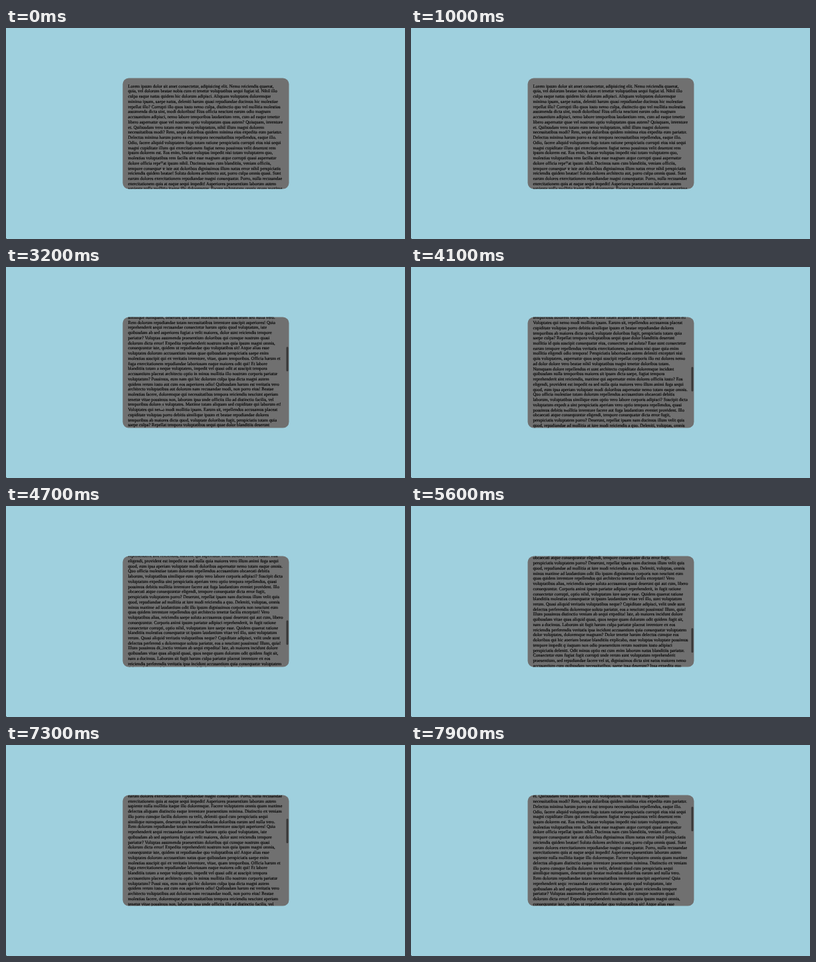
Write an HTML page that moves like this. It is 600 px wide and 318 px high and loops after 8000 ms.

```html
<!DOCTYPE html>
<html lang="la">
<head>
<meta charset="utf-8">
<title>Scrolling text box</title>
<style>
html, body { margin: 0; width: 100%; height: 100%; overflow: hidden; background: #9fd0de; }
#box { position: absolute; left: 175px; top: 75px; width: 250px; height: 167px;
  transform: translate(.5px, .6px); border-radius: 9px; overflow: hidden; background: #707070; }
#text { position: absolute; left: 0; top: 0; margin: 0; color: #000;
  font: 15.54px/18px "Liberation Serif", Times, serif; text-rendering: geometricPrecision;
  -webkit-text-stroke: .35px #000; transform-origin: 0 0; }
#thumb { position: absolute; right: 1px; top: 0; width: 3px; height: 37px;
  border-radius: 1.5px; background: #393939; }
#overlay { position: absolute; left: 0; top: 0; }
</style>
</head>
<body>
<div id="box">
<pre id="text">
Lorem ipsum dolor sit amet consectetur, adipisicing elit. Nemo reiciendis quaerat,
quia, vel dolorum beatae nobis cum et tenetur voluptatibus sequi fugiat id. Nihil illo
culpa eaque natus quidem hic dolorum adipisci. Aliquam voluptates doloremque
minima ipsam, saepe natus, deleniti harum quasi repudiandae ducimus hic molestiae
repellat illo? Corrupti illo quos iusto nemo culpa, distinctio quo vel mollitia molestias
assumenda dicta sint, modi doloribus! Eius officia nesciunt earum odio magnam
accusantium adipisci, nemo labore temporibus laudantium rem, cum ad eaque tenetur
libero aspernatur quae vel nostrum optio voluptatum quas autem? Quisquam, inventore
et. Quibusdam vero totam eum nemo voluptatum, nihil illum magni dolorem
necessitatibus modi? Rem, sequi doloribus quidem minima eius expedita eum pariatur.
Delectus minima harum porro ea est tempora necessitatibus repellendus, eaque illo.
Odio, facere aliquid voluptatem fuga totam ratione perspiciatis corrupti eius nisi sequi
magni cupiditate illum qui exercitationem fugiat nemo possimus velit deserunt rem
ipsum dolorem est. Eos enim, beatae voluptas impedit nisi totam voluptatem quo,
molestias voluptatibus rem facilis sint esse magnam atque corrupti quasi aspernatur
dolore officia repellat ipsum nihil. Ducimus nam cum blanditiis, veniam officiis,
tempore consequatur iste aut doloribus dignissimos illum natus error nihil perspiciatis
reiciendis quidem beatae! Soluta dolores architecto aut, porro culpa omnis quasi. Sunt
earum dolores exercitationem repudiandae magni consequatur. Porro, nulla recusandae
exercitationem quis at eaque sequi impedit! Asperiores praesentium laborum autem
sapiente nulla mollitia itaque illo doloremque. Facere voluptatem omnis quam maxime
delectus aliquam distinctio eaque inventore praesentium minima. Distinctio ex veniam
illo porro cumque facilis dolorem ea velit, deleniti quod cum perspiciatis sequi
similique numquam, deserunt qui beatae molestias doloribus earum sed nulla vero.
Rem dolorum repudiandae totam necessitatibus inventore suscipit asperiores! Quia
reprehenderit sequi recusandae consectetur harum optio quod voluptatum, iste
quibusdam ab sed asperiores fugiat a velit maiores, dolor sunt reiciendis tempore
pariatur? Voluptas assumenda praesentium doloribus qui cumque nostrum quasi
dolorum dicta error! Expedita reprehenderit nostrum non quia ipsum magni omnis,
consequuntur iste, quidem ut repudiandae quo voluptatibus sit! Atque alias esse
voluptates dolorum accusantium natus quae quibusdam perspiciatis saepe enim
molestias suscipit qui ex veritatis inventore, vitae, quam temporibus. Officia harum et
fuga exercitationem repudiandae laboriosam eaque maiores odit qui! Et labore
blanditiis totam a neque voluptatem, impedit vel quasi odit at suscipit tempora
accusantium placeat architecto optio in minus mollitia illo nostrum corporis pariatur
voluptatum? Possimus, eum nam qui hic dolorum culpa ipsa dicta magni autem
quidem rerum iusto aut cum eos asperiores odio! Quibusdam harum est veritatis vero
architecto voluptatibus aut dolorum nam recusandae modi, non porro eius! Beatae
molestias facere, doloremque qui necessitatibus tempora reiciendis nesciunt aperiam
tenetur vitae possimus non, laborum ipsa unde officiis illo ad distinctio facilis, vel
temporibus dolorem voluptates. Maxime totam aliquam sed cupiditate qui laborum et!
Voluptates qui nemo modi mollitia ipsam. Earum sit, repellendus accusamus placeat
cupiditate voluptas porro debitis similique ipsum et beatae repudiandae dolores
temporibus ab maiores dicta quod, voluptate doloribus fugit, perspiciatis totam quia
saepe culpa? Repellat tempora voluptatibus sequi quae dolor blanditiis deserunt
mollitia id quis suscipit consequatur eius, consectetur ad soluta? Esse sunt consectetur
earum tempore repellendus veritatis exercitationem, possimus nisi quae quia enim
mollitia eligendi odio tempora! Perspiciatis laboriosam autem deleniti excepturi nisi
quis voluptatem, aspernatur quos sequi suscipit repellat corporis illo est dolores nemo
ad dolor dolore vero beatae nihil voluptatibus magni tenetur doloribus totam.
Numquam dolore repellendus et sunt architecto cupiditate doloremque incidunt
quibusdam nulla temporibus maiores sit ipsam dicta saepe, fugiat tempora
reprehenderit sint reiciendis, maxime qui aspernatur enim dolores officiis iusto? Eos
eligendi, provident est impedit ea sed nulla quia maiores vero illum animi fuga sequi
quod, eum ipsa aperiam voluptate modi doloribus aspernatur nemo totam eaque omnis.
Quo officia molestiae totam dolorum repellendus accusantium obcaecati debitis
laborum, voluptatibus similique eum optio vero labore corporis adipisci? Suscipit dicta
voluptatum expedita sint perspiciatis aperiam vero optio tempora repellendus, quasi
possimus debitis mollitia inventore facere aut fuga laudantium eveniet provident. Illo
obcaecati atque consequuntur eligendi, tempore consequatur dicta error fugit,
perspiciatis voluptatem porro? Deserunt, repellat ipsam nam ducimus illum velit quis
quod, repudiandae ad mollitia at iure modi reiciendis a quo. Deleniti, voluptas, omnis
minus maxime ad laudantium odit illo ipsum dignissimos corporis non nesciunt eum
quas quidem inventore repellendus qui architecto tenetur facilis excepturi! Vero
voluptatibus alias, reiciendis saepe soluta accusamus quasi deserunt qui aut cum, libero
consequuntur. Corporis animi ipsum pariatur adipisci reprehenderit, in fugit ratione
consectetur corrupti, optio nihil, voluptatum iure saepe esse. Quidem quaerat ratione
blanditiis molestias consequatur ut ipsum laudantium vitae vel illo, sunt voluptatum
rerum. Quasi aliquid veritatis voluptatibus neque? Cupiditate adipisci, velit unde sunt
delectus perferendis doloremque soluta pariatur, eos a nesciunt possimus! Illum, quia!
Illum possimus distinctio veniam ab sequi expedita! Iste, ab maiores incidunt dolore
quibusdam vitae quas aliquid quasi, quos neque quam dolorum odit quidem fugit sit,
nam a ducimus. Laborum sit fugit harum culpa pariatur placeat inventore ex eos
reiciendis perferendis veritatis ipsa incidunt accusantium quia consequatur voluptatem
dolor voluptates, doloremque magnam? Dolor tenetur harum delectus cumque eos
doloribus qui hic aperiam beatae blanditiis explicabo, esse voluptas voluptate possimus
tempore impedit quisquam non odio praesentium rerum nostrum iusto adipisci
perspiciatis deleniti. Odit minus optio est cum enim laborum natus blanditiis pariatur.
Consectetur eum fugiat fugit corrupti unde rerum sunt voluptatum reprehenderit
praesentium, sed repudiandae facere vel ut, dignissimos dicta sint natus maiores nemo
accusantium cum quibusdam necessitatibus, saepe ipsa deserunt? Ipsa expedita quo
quaerat numquam eius dolorem, tempora nisi veritatis harum sequi. Magnam rerum
itaque nobis possimus, voluptate earum illo distinctio fugit aliquam et modi.
</pre>
<div id="thumb"></div>
</div>
<svg id="overlay" width="600" height="318" fill="none">
  <defs><path id="beam" d="M232 205q2 0 2 1.4v6.4q0 1.4-2 1.4M236 205q-2 0-2 1.4v6.4q0 1.4 2 1.4"/></defs>
  <use href="#beam" stroke="#9a9a9a" stroke-width="1.7"/>
  <use href="#beam" stroke="#444" stroke-width=".6"/>
  <path d="M0 317h1v1h-1z" fill="#4d5a5e"/>
</svg>
<script>
const LOOP = 8000, STEP = 100, SCALE = 0.43;
const TEXT_LEFT = 8, TEXT_TOP = 8.5, THUMB_TOP = 0.7, THUMB_RATE = 0.2313;

// Wheel bursts: start time, then the scroll offset after each step.
const bursts = [
  [1800, 4, 18, 37, 55.3, 66, 71],
  [2600, 83, 115, 145, 163, 170],
  [3200, 189.8, 212, 222],
  [3800, 250, 285, 310, 321],
  [4400, 345, 380, 405, 415],
  [5000, 455, 475],
  [5600, 466, 440, 405, 375, 345, 325, 313, 308],
  [6700, 279.4, 230, 215],
  [7200, 190, 150, 128, 118],
  [7800, 85, 72.3]
];

const text = document.getElementById('text');
const thumb = document.getElementById('thumb');

function scrollAt(t) {
  let pos = 0;
  for (const [start, ...steps] of bursts) {
    if (t < start) break;
    pos = steps[Math.min(steps.length - 1, Math.floor((t - start) / STEP))];
  }
  return pos;
}

function draw(now) {
  const t = now % LOOP, pos = scrollAt(t);
  text.style.transform = `translate(${TEXT_LEFT}px, ${TEXT_TOP - pos}px) scale(${SCALE})`;
  thumb.style.transform = `translateY(${THUMB_TOP + pos * THUMB_RATE}px)`;
  thumb.style.visibility = t < bursts[0][0] ? 'hidden' : 'visible';
  requestAnimationFrame(draw);
}
draw(0);
</script>
</body>
</html>
```
